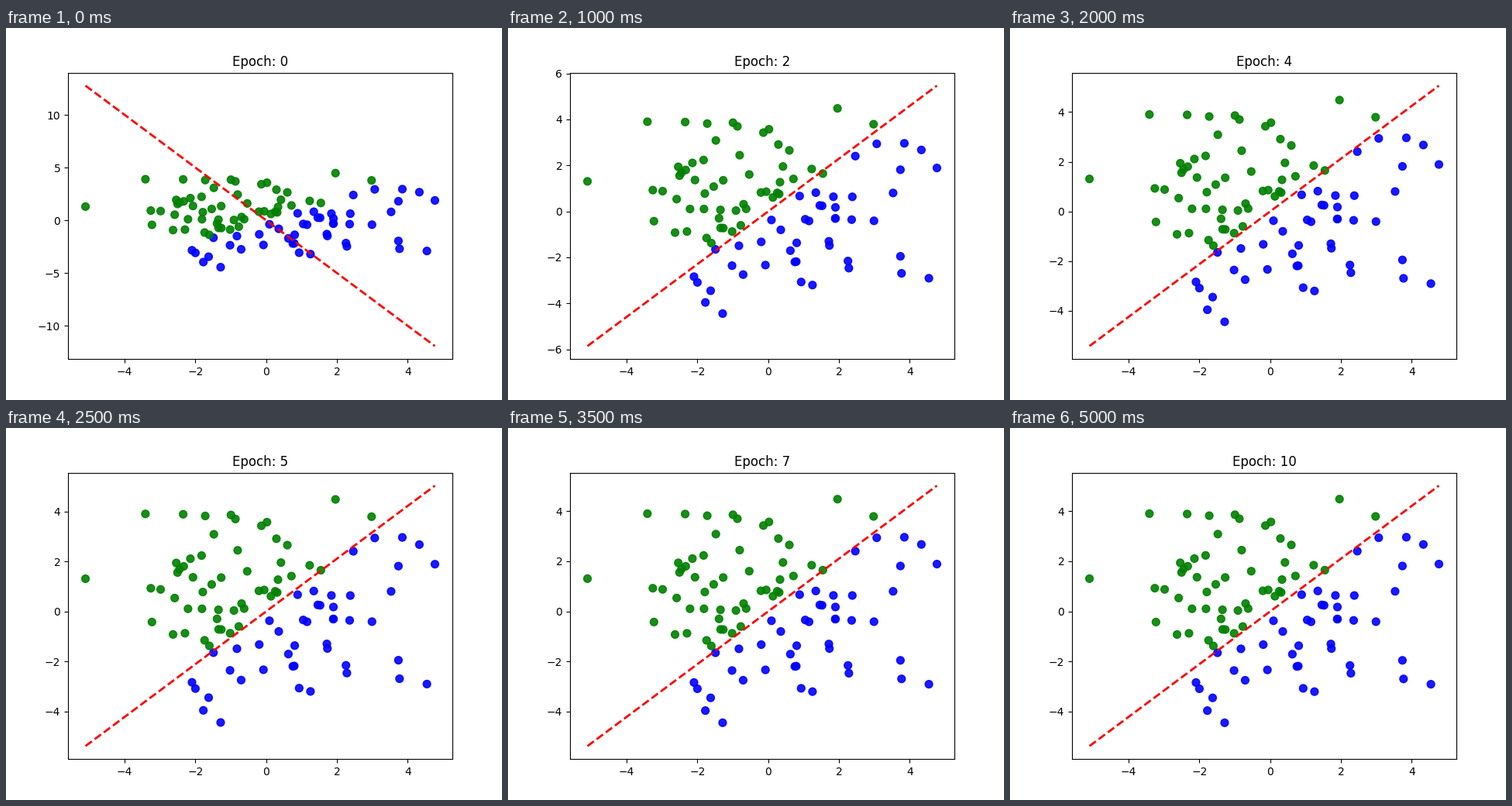
Write a matplotlib script that moves like this. It is 640 px wide and 480 px high and loops after 5.5 s.

```python
import matplotlib.pyplot as plt
import numpy as np
from matplotlib.animation import FuncAnimation

EPOCHS = 11
LOOP_MS = 5500

np.random.seed(0)
points = np.random.randn(100, 2) * 2
x, y = points.T
colors = np.where(y > x, "green", "blue")
ends = np.array([x.min(), x.max()])

fig, ax = plt.subplots(figsize=(6.4, 4.8), dpi=100)


def slope(epoch):
    """Two big swings, then a geometric approach to the final slope."""
    if epoch < 2:
        return (-2.503, 1.714)[epoch]
    return 1.053 + 0.0945 * 0.31 ** (epoch - 2)


def draw(epoch):
    ax.clear()
    ax.scatter(x, y, c=colors, s=50, alpha=0.9)
    ax.plot(ends, slope(epoch) * ends, "r--", lw=2)
    ax.set_title(f"Epoch: {epoch}")


anim = FuncAnimation(fig, draw, frames=EPOCHS, init_func=lambda: None,
                     interval=LOOP_MS / EPOCHS, repeat=True, repeat_delay=0)
plt.show()
```
